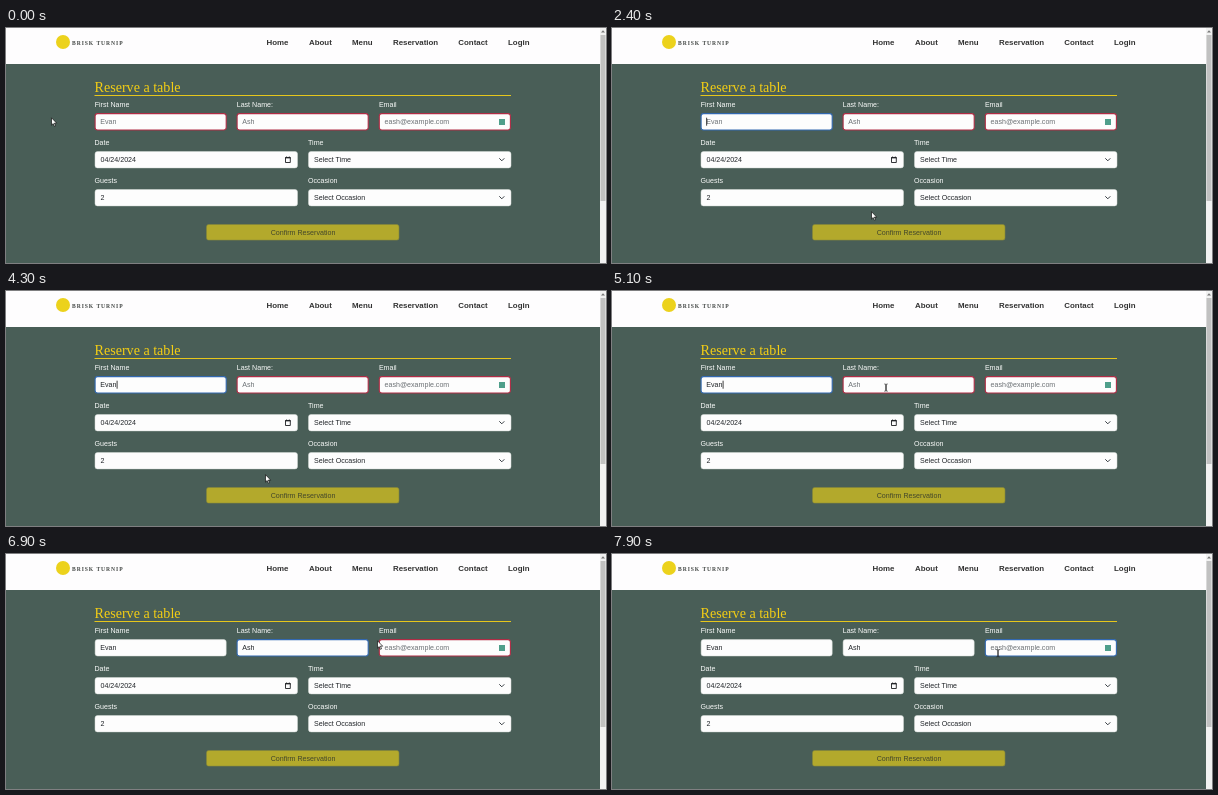
Write an HTML page that moves like this. It is 600 px wide and 235 px high and loops after 8000 ms.

```html
<!DOCTYPE html>
<html lang="en">
<head>
<meta charset="utf-8">
<title>Reserve a table</title>
<style>
  html, body { margin: 0; width: 100%; height: 100%; overflow: hidden; background: #495e57; }
  svg { display: block; width: 600px; height: 235px; font-family: "Liberation Sans", Arial, sans-serif; }
  .nav { font-size: 7.9px; font-weight: bold; fill: #333; }
  .label { font-size: 7.1px; fill: #fafbfa; }
  .value { font-size: 7.1px; fill: #212529; }
  .hint { font-size: 7.1px; fill: #6c7175; }
</style>
</head>
<body>
<svg id="stage" viewBox="0 0 600 235">
  <rect width="600" height="235" fill="#495e57"/>
  <rect width="594" height="36" fill="#fefdfe"/>
  <circle cx="57" cy="14" r="7" fill="#ecd21c"/>
  <text x="66" y="16.8" font-family="Liberation Serif, serif" font-size="5.6" font-weight="bold" letter-spacing=".95" fill="#444846">BRISK TURNIP</text>
  <rect x="594" width="6" height="235" fill="#f1f1f1"/>
  <rect x="594.5" y="7" width="5" height="166" fill="#c1c1c1"/>
  <path d="M595 4.5h4l-2-2.3z" fill="#777"/>
  <text x="88.5" y="63.5" font-family="Liberation Serif, serif" font-size="14.1" fill="#f4ce14">Reserve a table</text>
  <rect x="88.5" y="67" width="416.5" height="1" fill="#e6c61c"/>
  <g transform="translate(0 -.5)">
    <g id="page"></g>
    <g id="fields"></g>
    <rect x="493" y="91.5" width="6" height="6" fill="#4f9f8b"/>
    <g fill="none" stroke="#1c1f22">
      <path d="M279.5 130h4.8v5h-4.8zM279 130.4h5.8M280.6 129v1M283.3 129v1" stroke-width=".9"/>
      <path d="M493.3 130.8l2.5 2.5 2.5-2.5M493.3 168.8l2.5 2.5 2.5-2.5" stroke="#343a40"/>
    </g>
    <rect x="200.5" y="197" width="192.5" height="15.6" rx="2.2" fill="#b3a92c" stroke="#85863a" stroke-width=".6"/>
    <text x="297" y="207" text-anchor="middle" font-size="7.1" fill="#43472b">Confirm Reservation</text>
  </g>
  <path id="arrow" d="M0 0v7.4l1.7-1.6 1.2 2.7 1.2-.5-1.2-2.6h2.3z" fill="#fff" stroke="#111" stroke-width=".7"/>
  <path id="beam" d="M-1.6-3.6q1.6 0 1.6.7v5.8q0 .7-1.6.7M1.6-3.6q-1.6 0-1.6.7v5.8q0 .7 1.6.7" fill="none" stroke="#222" stroke-width=".8"/>
</svg>
<script>
const LOOP = 8000, STEP = 100, BLINK = 530;
const $ = id => document.getElementById(id);

function add(parent, tag, attrs, text = "") {
  const el = document.createElementNS("http://www.w3.org/2000/svg", tag);
  for (const k in attrs) el.setAttribute(k, attrs[k]);
  el.textContent = text;
  parent.append(el);
  return el;
}
const write = (x, y, cls, text) => add($("page"), "text", { x, y, class: cls }, text);

[["Home", 260.5], ["About", 303], ["Menu", 346], ["Reservation", 387], ["Contact", 452.3], ["Login", 502]]
  .forEach(([text, x]) => write(x, 17.3, "nav", text));

[["Date", "04/24/2024", 89, 124], ["Time", "Select Time", 302.5, 124],
 ["Guests", "2", 89, 162], ["Occasion", "Select Occasion", 302.5, 162]]
  .forEach(([label, value, x, y]) => {
    write(x - .5, y - 6.8, "label", label);
    add($("page"), "rect", { x, y, width: 202.5, height: 16.4, rx: 2.5, fill: "#fdfdfd", stroke: "#d5dad7", "stroke-width": .5 });
    write(x + 5.5, y + 10.5, "value", value);
  });

// keys: times at which each character is typed
const fields = [
  { label: "First Name", hint: "Evan", x: 89, focus: 1340, blur: 5170, keys: [3480, 3680, 3840, 4000] },
  { label: "Last Name:", hint: "Ash", x: 231, focus: 5170, blur: 7280, keys: [5980, 6190, 6360] },
  { label: "Email", hint: "eash@example.com", x: 373.2, focus: 7280, blur: LOOP, keys: [] }
];
for (const f of fields) {
  write(f.x - .3, 79.2, "label", f.label);
  f.box = add($("fields"), "rect", { x: f.x + .1, y: 86.1, width: 131.1, height: 16.4, rx: 2.5, fill: "#fdfdfd" });
  f.text = add($("fields"), "text", { x: f.x + 5.3, y: 96.6 });
  f.caret = add($("fields"), "rect", { y: 90.2, width: .8, height: 8, fill: "#111" });
}

function drawField(f, t) {
  const active = t >= f.focus && t < f.blur;
  const typed = f.keys.filter(k => k <= t);
  const n = typed.length;
  f.text.textContent = n ? f.hint.slice(0, n) : f.hint;
  f.text.setAttribute("class", n ? "value" : "hint");
  f.box.setAttribute("stroke", active ? "#3268b0" : n ? "#d5dad7" : "#b02c45");
  f.box.setAttribute("stroke-width", active || !n ? 1.1 : .5);
  const since = t - (n ? typed[n - 1] : f.focus);
  const lit = active && Math.floor(since / BLINK) % 2 === 0;
  f.caret.style.display = lit ? "" : "none";
  if (lit) f.caret.setAttribute("x", f.x + 5.3 + (n ? f.text.getComputedTextLength() + .2 : 0));
}

// pointer stops: start, end, x, y
const start = [45.5, 89.8];
const moves = [
  [550, 1150, 122, 98],
  [1420, 2000, 259.5, 183.7],
  [4350, 5100, 274, 96.6],
  [6400, 6900, 371.5, 86.8],
  [6950, 7250, 386, 99.3]
];
function pointer(t) {
  let [x, y] = start;
  for (const [a, b, tx, ty] of moves) {
    const p = Math.min(1, Math.max(0, (t - a) / (b - a)));
    const e = p * p * (3 - 2 * p);
    x += (tx - x) * e;
    y += (ty - y) * e;
  }
  return [x, y];
}
const inside = (x, y, l, top, w) => x > l && x < l + w && y > top && y < top + 16.4;

function draw(t) {
  fields.forEach(f => drawField(f, t));
  const [x, y] = pointer(t);
  const overText = fields.some(f => inside(x, y, f.x, 85.5, 131.3)) || inside(x, y, 89, 161.5, 202.5);
  for (const id of ["arrow", "beam"]) {
    $(id).setAttribute("transform", `translate(${x} ${y})`);
    $(id).style.display = (id === "beam") === overText ? "" : "none";
  }
}

const origin = performance.now();
function tick() {
  const t = (performance.now() - origin) % LOOP;
  draw(Math.floor(t / STEP) * STEP);
  requestAnimationFrame(tick);
}
tick();
</script>
</body>
</html>
```
